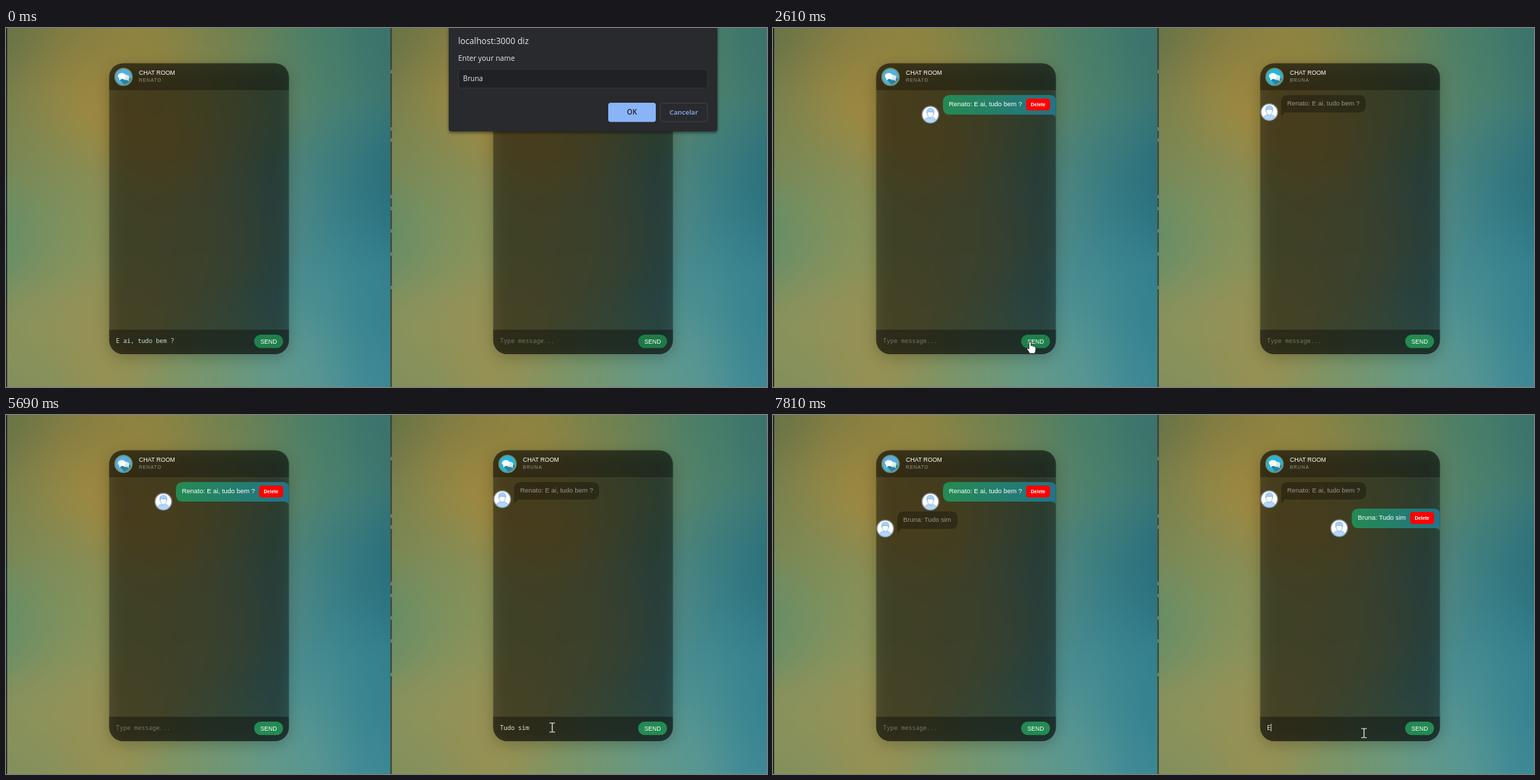
An HTML page with a canvas that plays this animation: 1088x514 px, repeating every 8 s.

```html
<!DOCTYPE html>
<html lang="pt">
<head>
<meta charset="utf-8">
<title>Chat room</title>
<style>
html, body { margin: 0; width: 100%; height: 100%; overflow: hidden; background: #1c2425; }
canvas, svg { position: absolute; left: 0; top: 0; width: 1088px; height: 514px; }
text { font-family: "Liberation Sans", Arial, sans-serif; white-space: pre; }
.ui text { font-family: "Open Sans", "Noto Sans", sans-serif; }
.mono { font: 8.67px "Noto Sans Mono", "DejaVu Sans Mono", monospace; }
</style>
</head>
<body>
<canvas id="bg" width="1088" height="514"></canvas>
<svg id="stage" viewBox="0 0 1088 514" xmlns="http://www.w3.org/2000/svg"></svg>
<script>
const LOOP = 8000, PANE = 549, CHAR = 5.2;
const SENT = 2440, REPLY = 6557, CLOSE = 1300;
const HOST = 'Renato', GUEST = 'Bruna';
const HELLO = 'E ai, tudo bem ?', ANSWER = 'Tudo sim', HINT = 'Type message...';

// Backdrop: colour points blended by distance
const POINTS = [
  [0, 0, '#5f7048'], [90, 20, '#857d42'], [100, 105, '#a88c3e'], [215, 25, '#8f8440'],
  [215, 130, '#a08238'], [320, 20, '#6a7f50'], [300, 110, '#8a8a50'], [380, 110, '#618564'],
  [440, 40, '#487f69'], [549, 20, '#39716d'], [5, 130, '#728050'], [60, 195, '#7f8c58'],
  [0, 300, '#5a8c6a'], [90, 290, '#86945c'], [200, 260, '#8e8c50'], [300, 290, '#808e60'],
  [390, 250, '#5b8a80'], [455, 170, '#3f7f7c'], [540, 220, '#266a78'], [470, 280, '#32808f'],
  [430, 370, '#4d9092'], [540, 400, '#31808f'], [60, 400, '#92935a'], [160, 430, '#999050'],
  [10, 500, '#82905c'], [280, 490, '#7c9464'], [350, 490, '#659a84'], [420, 490, '#579796'],
  [549, 510, '#3a8795']
];

function paintBackdrop() {
  const w = 137, h = 128, field = document.createElement('canvas');
  field.width = w; field.height = h;
  const fc = field.getContext('2d'), img = fc.createImageData(w, h);
  const pts = POINTS.map(([x, y, c]) => ({ x, y, rgb: [1, 3, 5].map(i => parseInt(c.substr(i, 2), 16)) }));
  for (let j = 0; j < h; j++) for (let i = 0; i < w; i++) {
    const sum = [0, 0, 0];
    let total = 0;
    for (const p of pts) {
      const d = (p.x - i * 4) ** 2 + (p.y - j * 4) ** 2;
      const k = Math.exp(-d / 6000);
      total += k;
      p.rgb.forEach((v, n) => { sum[n] += v * k; });
    }
    const o = (j * w + i) * 4;
    sum.forEach((v, n) => { img.data[o + n] = v / total; });
    img.data[o + 3] = 255;
  }
  fc.putImageData(img, 0, 0);
  const ctx = document.getElementById('bg').getContext('2d');
  ctx.imageSmoothingQuality = 'high';
  ctx.drawImage(field, 0, 0, PANE, 514);
  ctx.drawImage(field, PANE, 0, PANE, 514);
  ctx.fillStyle = '#10181a';
  ctx.fillRect(0, 0, 1.5, 514);
  ctx.fillStyle = '#2b3c3c';
  ctx.fillRect(549.5, 0, 2, 514);
  ctx.fillStyle = 'rgba(190,205,190,.6)';
  [62, 144, 160, 241, 258, 290, 323, 371].forEach(y => ctx.fillRect(550, y - 2, 1.2, 5));
}

const text = (x, y, size, fill, str, extra = '') =>
  `<text x="${x}" y="${y}" font-size="${size}" fill="${fill}" ${extra}>${str}</text>`;
const rect = (x, y, w, h, r, fill, extra = '') =>
  `<rect x="${x}" y="${y}" width="${w}" height="${h}" rx="${r}" fill="${fill}" ${extra}/>`;

const chatIcon = blue => `<g transform="translate(168 70)">
  <circle r="12.2" fill="${blue}" stroke="#74906c" stroke-width="1.8"/>
  <path d="M-6 3L1 11.2Q8 9 10.8 3L7.5-1Z" fill="#2d829c"/>
  <ellipse cx="3.4" cy=".8" rx="5" ry="3.8" fill="#d8e8ea"/><path d="M4 3L7.5 6.5V2Z" fill="#d8e8ea"/>
  <ellipse cx="-2.4" cy="-1.2" rx="5.6" ry="4.2" fill="#fff"/><path d="M-6 1V5L-1 2Z" fill="#fff"/></g>`;

const avatar = (x, y) => `<g transform="translate(${x} ${y})">
  <circle r="12" fill="#fff" stroke="#80868a" stroke-width="1.5"/>
  <path d="M-8.3 8.3Q-7.5 4.8-2.4 3.8L0 6 2.4 3.8Q7.5 4.8 8.3 8.3A11.5 11.5 0 0 1-8.3 8.3Z" fill="#b5d6f5" stroke="#79aee0" stroke-width=".7"/>
  <path d="M-4.4-4V-1Q-3.5 4 0 4.3 3.5 4 4.4-1V-4Z" fill="#fff" stroke="#79aee0" stroke-width=".8"/>
  <path d="M-5-1.8Q-6.5-9 0-9.2 6.5-9 5-1.8L3.8-4Q0-3-2.5-5L-4-3.8Z" fill="#a9cff2" stroke="#79aee0" stroke-width=".6"/></g>`;

// Bubble with a square corner on one side and a small tail below it
function ownMessage(id, x, y, str) {
  const r = 404.5, b = y + 28;
  return `<g id="${id}">${avatar(x - 18, b)}
    <path d="M${x + 10} ${y}H${r - 9}Q${r} ${y} ${r} ${y + 8}V${b + 4}Q${r - 2} ${b} ${r - 7} ${b}H${x + 10}Q${x} ${b} ${x} ${b - 10}V${y + 10}Q${x} ${y} ${x + 10} ${y}Z" fill="url(#own)"/>
    ${text(x + 8.5, y + 16, 9.45, '#fff', str)}
    ${rect(362, y + 5, 34, 17, 4, '#f00')}
    ${text(379, y + 16, 7, '#fff', 'Delete', 'font-weight="700" text-anchor="middle"')}</g>`;
}
function otherMessage(id, y, w, str) {
  return `<g id="${id}" data-y="${y}">${avatar(-17, 24.5)}
    <path d="M10 0H${w - 10}Q${w} 0 ${w} 10V15Q${w} 25 ${w - 10} 25H5.5L0 31V10Q0 0 10 0Z" fill="rgba(0,0,0,.3)"/>
    ${text(8.5, 15, 9.45, 'rgba(255,255,255,.5)', str)}</g>`;
}

const card = (side, dx, name, blue, messages) => `<g transform="translate(${dx} 0)">
  ${rect(147.5, 55, 257, 417, 20, 'rgba(0,0,0,.22)', 'filter="url(#soft)"')}
  <g clip-path="url(#card)">
    ${rect(147, 50, 258, 418, 0, 'rgba(0,0,0,.42)')}
    ${rect(147, 50, 258, 39, 0, 'rgba(0,0,0,.28)')}
    ${rect(147, 432, 258, 36, 0, 'rgba(0,0,0,.35)')}
    ${messages}
  </g>
  ${chatIcon(blue)}
  ${text(190, 67.4, 8.6, '#fff', 'CHAT ROOM')}
  ${text(190, 76.6, 6.6, 'rgba(255,255,255,.5)', name.toUpperCase(), 'letter-spacing=".95"')}
  <text id="field${side}" class="mono" x="157.3" y="450.7"></text>
  ${rect(354.7, 439, 41.5, 19.3, 9.6, '#248a52', `id="send${side}"`)}
  ${text(375.5, 451.8, 8.5, '#fff', 'SEND', 'text-anchor="middle"')}</g>`;

const dialog = `<g id="dialog" class="ui">
  ${rect(633, -6, 384, 156, 4, 'rgba(0,0,0,.5)', 'filter="url(#edge)"')}
  ${rect(633, -6, 384, 154, 4, '#292a2d')}
  ${text(646.5, 23, 12.1, '#e8eaed', 'localhost:3000 diz')}
  ${text(646.5, 47.4, 10.4, '#e8eaed', 'Enter your name')}
  ${rect(647, 59, 356, 27, 2, '#202124', 'id="nameBox"')}
  ${text(653.5, 76, 10, '#e8eaed', GUEST)}
  ${rect(681.5, 66, 1, 13, 0, '#e8eaed', 'id="nameCaret"')}
  ${rect(861, 107, 68, 27.5, 3.5, '#8ab4f8', 'id="ok"')}
  <circle id="ripple" cx="898" cy="126" fill="rgba(32,33,36,.2)" clip-path="url(#okClip)"/>
  ${text(895, 124, 10, '#202124', 'OK', 'text-anchor="middle" font-weight="600"')}
  ${rect(935.5, 107.5, 67.5, 26.5, 3.5, 'none', 'stroke="#3f4246"')}
  ${text(969, 124, 9.7, '#8ab4f8', 'Cancelar', 'text-anchor="middle" font-weight="600"')}</g>`;

const cursors = `<g id="cursor">
  <path id="arrow" d="M0 0V15L3.5 11.8 5.7 17 8.2 15.9 6 10.8H10.7Z" fill="#fff" stroke="#111" stroke-width=".8"/>
  <path id="hand" d="M-1.5 1Q0-.8 1.5 1V6Q3 5 4.2 6.5 5.8 5.8 6.6 7.2 8.3 7 8.3 9V12Q8 14.5 6.8 17H-.5Q-2 14-4.6 10.5-4.4 8.4-1.5 10.5Z" fill="#fff" stroke="#111" stroke-width=".8"/>
  <path id="beam" d="M-4-6.5H-1L0-6 1-6.5H4M0-6V6M-4 6.5H-1L0 6 1 6.5H4" fill="none" stroke="#f2f2f2" stroke-width="1.2"/></g>`;

document.getElementById('stage').innerHTML = `<defs>
  <linearGradient id="own"><stop stop-color="#248a52"/><stop offset="1" stop-color="#257287"/></linearGradient>
  <clipPath id="card">${rect(147.5, 50.5, 257, 416.5, 20, '#000')}</clipPath>
  <clipPath id="okClip">${rect(861, 107, 68, 27.5, 3.5, '#000')}</clipPath>
  <filter id="soft" x="-20%" y="-20%" width="140%" height="140%"><feGaussianBlur stdDeviation="11"/></filter>
  <filter id="edge"><feGaussianBlur stdDeviation="2"/></filter></defs>` +
  card('L', 0, HOST, '#55aee0',
    ownMessage('helloL', 243, 96, `${HOST}: ${HELLO}`) + otherMessage('answerL', 138, 86.5, `${GUEST}: ${ANSWER}`)) +
  card('R', PANE, GUEST, '#27b4dc',
    otherMessage('helloR', 96, 121.5, `${HOST}: ${HELLO}`) + ownMessage('answerR', 278.5, 134, `${GUEST}: ${ANSWER}`)) +
  rect(0, 442, .9, 11, 0, '#e8ece4', 'id="caret"') + dialog + cursors;

const el = {};
document.querySelectorAll('#stage [id]').forEach(n => { el[n.id] = n; });
const show = (node, on) => { node.style.display = on ? '' : 'none'; };
const within = (t, a, b) => t >= a && t < b;

// Springy pop: [fraction of 500 ms, scale]
const BOUNCE = [[0, 0], [.047, .45], [.0941, .883], [.1411, 1.141], [.1872, 1.212], [.2432, 1.151],
  [.2993, 1.048], [.3554, .979], [.4104, .961], [.5215, .991], [.6326, 1.007], [.8549, .999], [1, 1]];
// Pointer path: [time, x, y]
const PATH = [[120, 1013, 456], [890, 892, 133], [990, 898, 126], [1300, 898, 126], [1710, 462, 434],
  [1780, 436, 430], [1850, 412, 444], [2270, 367, 449], [2600, 367, 449], [3170, 781, 447.5],
  [5720, 781, 447.5], [6120, 925, 461], [6450, 914, 451.5], [6800, 914, 451.5], [7280, 841, 453],
  [7400, 841, 453], [7410, 845, 455.5]];

// Value row at t, blended between neighbouring rows
function sample(rows, t, ease = k => k) {
  if (t <= rows[0][0]) return rows[0].slice(1);
  for (let i = 1; i < rows.length; i++) {
    const a = rows[i - 1], b = rows[i];
    if (t < b[0]) {
      const k = ease((t - a[0]) / (b[0] - a[0]));
      return a.slice(1).map((v, n) => v + (b[n + 1] - v) * k);
    }
  }
  return rows[rows.length - 1].slice(1);
}
const smooth = k => k * k * (3 - 2 * k);

function typed(t) {
  if (t >= 7740) return 'E';
  if (t < 4050 || t >= REPLY) return '';
  return ANSWER.slice(0, t < 4440 ? 1 : 2 + Math.floor((t - 4440) / 120));
}

function setField(node, str, ink, hintInk) {
  node.textContent = str || HINT;
  node.setAttribute('fill', str ? ink : hintInk);
}

function pop(node, x, t, start) {
  show(node, t >= start);
  const s = sample(BOUNCE, (t - start) / 500)[0];
  node.setAttribute('transform', `translate(${x} ${node.dataset.y}) scale(${s})`);
}

function drawPointer(t) {
  const [x, y] = sample(PATH, t, smooth);
  const px = x % PANE;
  const onSend = px > 355 && px < 396 && y > 439 && y < 458;
  const onField = px > 149 && px < 353 && y > 436 && y < 463;
  show(el.cursor, t >= 120);
  show(el.hand, onSend);
  show(el.beam, onField);
  show(el.arrow, !onSend && !onField);
  el.cursor.setAttribute('transform', `translate(${x} ${y})`);
  return { x, y, onSend };
}

function drawDialog(t) {
  const focus = t >= 1130;
  show(el.dialog, t < CLOSE);
  el.nameBox.setAttribute('stroke', focus ? '#8ab4f8' : '#34363a');
  el.nameBox.setAttribute('stroke-width', focus ? 2 : 1);
  show(el.nameCaret, focus);
  el.ok.setAttribute('fill', t >= 940 ? '#84a6e6' : '#8ab4f8');
  el.ripple.setAttribute('r', Math.max(0, Math.min(1, (t - 1130) / 100)) * 20.5);
}

function draw(t) {
  const p = drawPointer(t);
  drawDialog(t);
  show(el.helloL, t >= SENT);
  show(el.answerR, t >= REPLY);
  pop(el.helloR, 177.5, t, t < REPLY ? SENT : REPLY);
  pop(el.answerL, 177.5, t, REPLY);

  const str = typed(t);
  setField(el.fieldL, t < SENT ? HELLO : '', '#bfe3e0', '#72746a');
  setField(el.fieldR, str, '#e4e8de', '#6c7a5c');
  show(el.caret, within(t, 3500, 4050) || within(t, 4180, 5690) || within(t, 6220, 6450) || t >= 7810);
  el.caret.setAttribute('x', 706.4 + CHAR * str.length);

  const leftDown = t < SENT || (p.onSend && p.x < PANE);
  const rightDown = t < CLOSE || (p.onSend && p.x > PANE);
  el.sendL.setAttribute('fill', leftDown ? '#20804c' : '#248a52');
  el.sendR.setAttribute('fill', rightDown ? '#1f7a47' : '#248a52');
}

paintBackdrop();
const begin = performance.now();
function tick() {
  draw((performance.now() - begin) % LOOP);
  requestAnimationFrame(tick);
}
tick();
</script>
</body>
</html>
```
